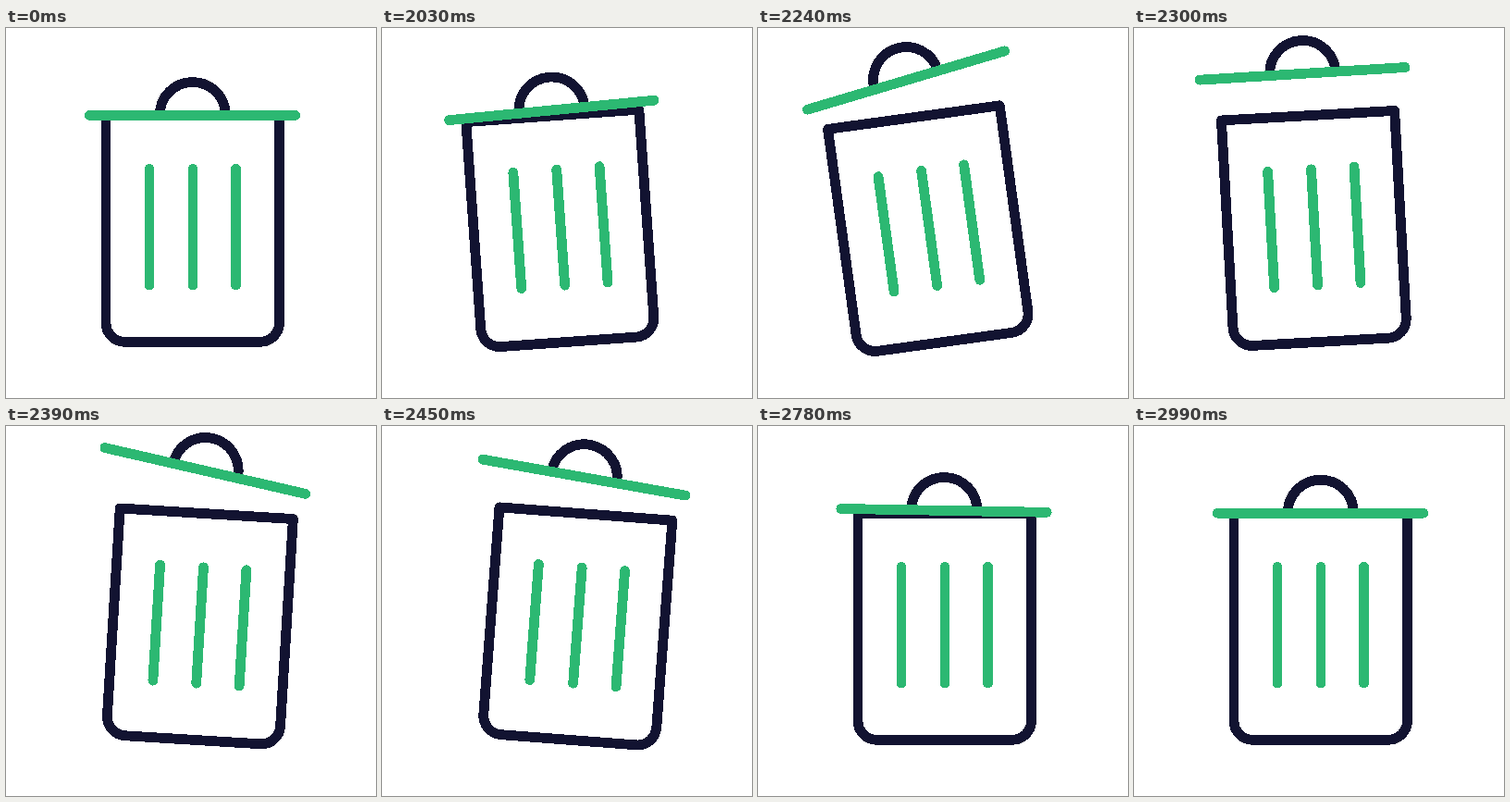
These frames come from a looping animation (400 px wide and 400 px high, 3.05 s). An HTML page:

```html
<!DOCTYPE html>
<html lang="en">
<head>
<meta charset="utf-8">
<title>Trash bin</title>
<style>
  html, body { margin: 0; width: 100%; height: 100%; overflow: hidden; background: #fff; }
  svg { display: block; width: 100%; height: 100%; fill: none; stroke-width: 10.8; shape-rendering: crispEdges; }
  .dark { stroke: #121331; stroke-linejoin: round; }
  .green { stroke: #2cb872; stroke-linecap: round; }
</style>
</head>
<body>
<svg viewBox="0 0 400 400">
  <g id="bin">
    <path class="dark" d="M108 94.3H295.5V318.8A20.5 20.5 0 0 1 275 339.3H128.5A20.5 20.5 0 0 1 108 318.8Z"/>
    <path class="green" d="M155 152.5V278M202 152.5V278M248.5 152.5V278"/>
    <g id="lid">
      <path class="dark" d="M166.3 94V93.5A35.5 35 0 0 1 237.3 93.5V94"/>
      <path class="green" d="M90.3 94.4H312.8"/>
    </g>
  </g>
</svg>
<script>
  const LOOP = 3050, REST = 2000, STEP = 30, LAST = 33;
  const bin = document.getElementById('bin');
  const lid = document.getElementById('lid');

  const linear = u => u;
  const easeOut = u => 1 - (1 - u) ** 3;
  const easeInOut = u => (1 - Math.cos(Math.PI * u)) / 2;

  // Swings from 0 through the [step, value] turning points; only the first move differs in easing.
  function swings(firstEase, ...points) {
    return n => {
      let from = 0, value = 0, ease = firstEase;
      for (const [to, next] of points) {
        if (n < to) return value + (next - value) * ease((n - from) / (to - from));
        [from, value, ease] = [to, next, easeInOut];
      }
      return value;
    };
  }

  const tilt = swings(easeOut, [6, -9.7], [14.5, 4.6], [18, 0]);
  const turn = swings(linear, [7, -10], [13, 9.4], [18.5, -3.2], [26, 1], [LAST, 0]);
  const shift = swings(linear, [18, -5.8], [28, 0]);

  // The lid is thrown up along a sine, then settles with a long tail.
  function lift(n) {
    const x = n / 12;
    return 47.3 * (x < 1 ? Math.sin(x * Math.PI / 2) : (x * Math.exp(1 - x)) ** 7);
  }

  function draw(time) {
    const n = Math.max(0, Math.floor((time - REST) / STEP));
    bin.setAttribute('transform', `rotate(${tilt(n)} 202 339)`);
    lid.setAttribute('transform',
      `translate(${shift(n)} ${-lift(n)}) rotate(${turn(n)} 201.6 94.4)`);
  }

  const start = performance.now();
  function tick() {
    draw((performance.now() - start) % LOOP);
    requestAnimationFrame(tick);
  }
  tick();
</script>
</body>
</html>
```
